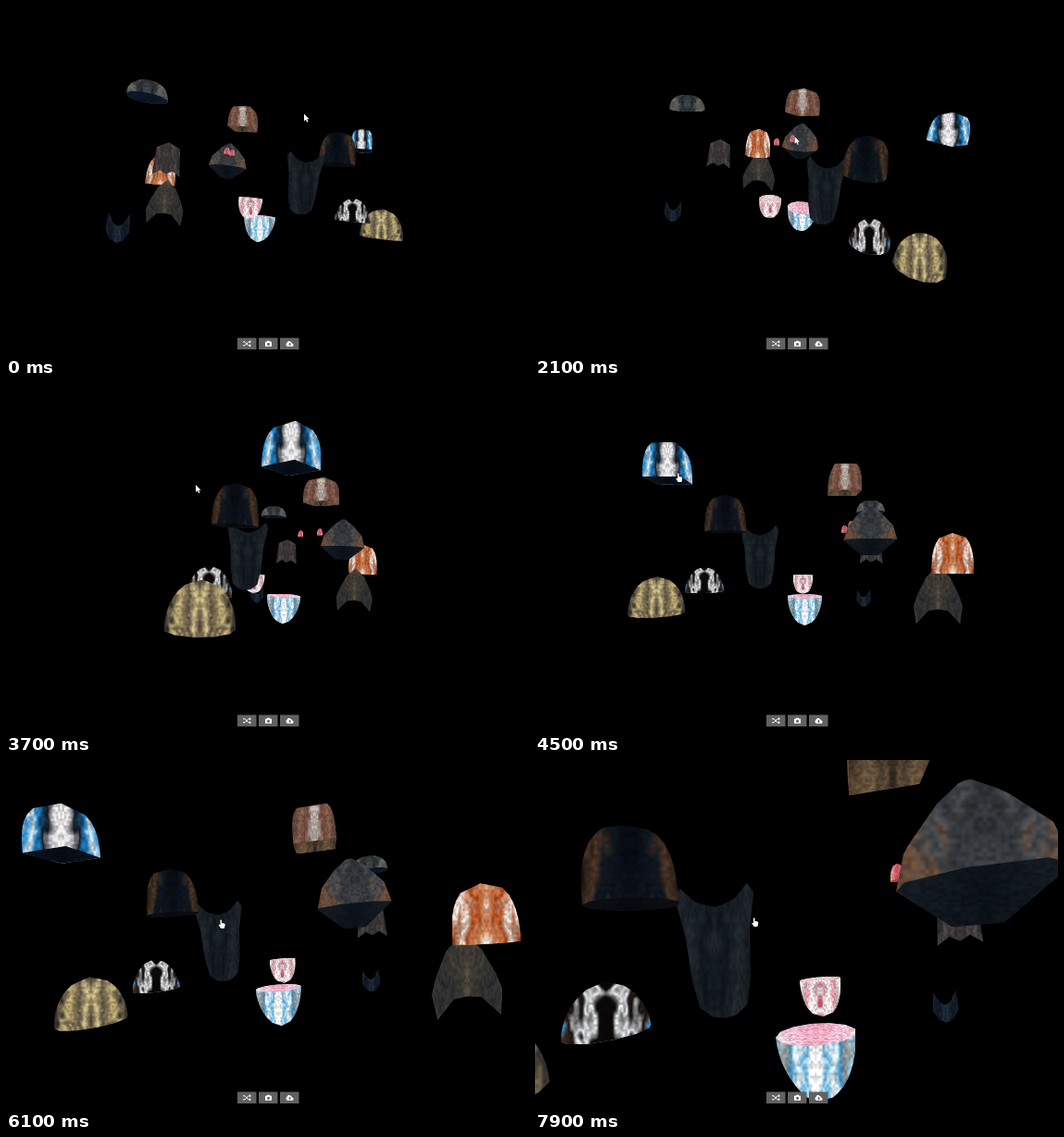
Recreate the animation shown at these times as an HTML page with a canvas. Size 565 px wide and 377 px high, loop 8 s.

```html
<!DOCTYPE html>
<html lang="en">
<head>
<meta charset="utf-8">
<title>Floating fragments</title>
<style>
  html, body { margin: 0; width: 100%; height: 100%; overflow: hidden; background: #000; }
  canvas { display: block; width: 565px; height: 377px; }
</style>
</head>
<body>
<canvas id="stage" width="565" height="377"></canvas>
<script>
const W = 565, H = 377, LOOP = 8000, STEP = 100, TEX = 96, FOCAL = 350;
const RAD = Math.PI / 180;
const ctx = document.getElementById('stage').getContext('2d');
const mix = (a, b, k) => a + (b - a) * k;

// Mirrored marble textures
const hash = (x, y, s) => {
  const v = Math.sin(x * 127.1 + y * 311.7 + s * 74.7) * 43758.5453;
  return v - Math.floor(v);
};
function noise(x, y, s) {
  const i = Math.floor(x), j = Math.floor(y);
  const soft = v => v * v * (3 - 2 * v);
  const u = soft(x - i), v = soft(y - j);
  return mix(mix(hash(i, j, s), hash(i + 1, j, s), u),
             mix(hash(i, j + 1, s), hash(i + 1, j + 1, s), u), v);
}
const rgb = hex => [1, 3, 5].map(i => parseInt(hex.substr(i, 2), 16));
let seed = 3;

// Colours run from the mirror axis to the edge
function marble(colors) {
  const cv = document.createElement('canvas');
  cv.width = cv.height = TEX;
  const g = cv.getContext('2d'), img = g.createImageData(TEX, TEX);
  const ramp = colors.split(' ').map(rgb), last = ramp.length - 1;
  seed += 7;
  for (let y = 0; y < TEX; y++) for (let x = 0; x < TEX; x++) {
    const u = Math.abs(x + .5 - TEX / 2) / (TEX / 2), v = y / TEX;
    const bend = noise(u * 3, v * 3, seed) - .5;
    const warp = noise(u * 3 + bend * 2, v * 2 + bend, seed + 1) * .6 + noise(u * 9, v * 7, seed + 2) * .25 - .42;
    const k = Math.max(0, Math.min(.999, u * .85 + .07 + warp * .8)) * last;
    const i = Math.floor(k), f = k - i;
    const light = .78 + .44 * noise(u * 20, v * 26, seed + 3);
    const o = (y * TEX + x) * 4;
    for (let c = 0; c < 3; c++) img.data[o + c] = mix(ramp[i][c], ramp[i + 1][c], f) * light;
    img.data[o + 3] = 255;
  }
  g.putImageData(img, 0, 0);
  return cv;
}

// Camera: time, yaw, pitch, roll, distance, drop
const CAMERA = [
  [0, 165, -4, -6, 350, 0],
  [600, 165, -4, -6, 350, 0],
  [1400, 155, 0, -10, 350, 0],
  [2800, 92, 33, 0, 345, 0],
  [3700, 47, 0, -3, 350, 0],
  [4500, 0, 0, 0, 350, 0],
  [5700, -10, 0, 5, 350, 0],
  [5900, -10, 0, 5, 350, 0],
  [6100, -10, 0, 5, 275, 4],
  [6400, -10, 0, 5, 250, 6],
  [6500, -10, 0, 5, 250, 6],
  [7200, -10, 0, 5, 165, 12],
  [LOOP, -10, 0, 5, 165, 12]
];

function slope(i, n) {
  const [a, b, c] = [CAMERA[i - 1], CAMERA[i], CAMERA[i + 1]];
  if (!a || !c || a[n] === b[n] || b[n] === c[n]) return 0;
  return (c[n] - a[n]) / (c[0] - a[0]);
}
function cameraAt(t) {
  const i = CAMERA.findIndex(k => k[0] > t) - 1;
  const p = CAMERA[i], q = CAMERA[i + 1], d = q[0] - p[0], s = (t - p[0]) / d, r = 1 - s;
  const at = n => p[n] * r * r * (1 + 2 * s) + q[n] * s * s * (3 - 2 * s) +
    d * s * r * (r * slope(i, n) - s * slope(i + 1, n));
  return { yaw: at(1) * RAD, pitch: at(2) * RAD, roll: at(3) * RAD, dist: at(4), drop: at(5) };
}

function project(cam, [x, y, z]) {
  const cy = Math.cos(cam.yaw), sy = Math.sin(cam.yaw);
  const cp = Math.cos(cam.pitch), sp = Math.sin(cam.pitch);
  const cr = Math.cos(cam.roll), sr = Math.sin(cam.roll);
  const px = x * cy + z * sy, pz = z * cy - x * sy;
  const py = y * cp - pz * sp, near = pz * cp + y * sp;
  const k = FOCAL / Math.max(20, cam.dist - near);
  return { x: 282 + (px * cr - py * sr) * k, y: 188 + cam.drop - (py * cr + px * sr) * k, k, near };
}

// Pieces sit at an angle, radius and height around the vertical axis
const pieces = [];
function add([angle, radius, y], [w, h], part) {
  pieces.push({ pos: [radius * Math.sin(angle * RAD), y, radius * Math.cos(angle * RAD)], w, h, ...part });
}

// A solid is a stack of rings, split at one level into an upper and a lower shell
function solid(place, size, sides, upper, lower, upColors, lowColors) {
  add(place, size, { sides, upper, lower, upTex: marble(upColors), lowTex: marble(lowColors) });
}
const arc = n => Array.from({ length: 9 }, (_, i) => [i / 8, Math.pow(1 - Math.pow(i / 8, n), 1 / n)]);
const dome = (place, size, sides, round, skin, base) =>
  solid(place, size, sides, arc(round), [[0, 1]], skin, base);
const bowl = (place, size, round, skin, lid) =>
  solid(place, size, 12, [[1, 1]], arc(round).map(([v, r]) => [1 - v, r]), lid, skin);

// A flat shape is half an outline, top to bottom, mirrored
const flat = (place, size, half, skin) => add(place, size, {
  outline: [...half, ...half.slice().reverse().map(([x, y]) => [-x, y])], tex: marble(skin)
});

dome([130, 130, 68], [37, 16], 12, 2.2, '#3c4144 #24282b #6a6a66 #343638', '#0a1522 #0c1a2a');
dome([54, 58, 77], [29, 29], 4, 3.2, '#b0a49c #6a4438 #7d5a4a #5c4238', '#2c241b #6b5640 #3c3023');
dome([77, 156, 4], [38, 39], 12, 2.6, '#f0e8e2 #c88a62 #a8481c #e6dcd4 #8c3f1a', '#a8481c #d8b090');
dome([-70, 75, 44], [41, 37], 12, 2.6, '#070b12 #0b1018 #10161e #4a3325 #16130f', '#07090d #0d1016');
dome([-42, 143, 72], [27, 29], 4, 2.8, '#e8e6e6 #b8b8bc #10151c #1a78b8 #d4dade #2c8fcc', '#060b13 #0a111c');
dome([-76, 95, -22], [38, 25], 12, 1.8, '#080706 #0c0a09 #dfe2e4 #14100e #4a3026 #2a86c6', '#2a86c6 #d8e4ec #1d6fae');
dome([-65, 138, -34], [48, 33], 12, 2, '#4b4034 #c9ba84 #5a5042 #b8a670 #34302b', '#2e2a25 #38332c');
bowl([163, 27, -32], [24, 22], 2.2, '#d0506a #c8c4c4 #f2e4e6 #e0909e #b4b0ae #fff4f4', '#f0dede #d8b0b8');
bowl([25, 21, -55], [36, 30], 1.8, '#f0f4f6 #6ab4dc #e4ecf0 #3a94c8 #8a8e90 #9cd0ea', '#f2a8c2 #f8dce6');
solid([53, 85, 24], [49, 45], 8, [[.32, 1], [.6, .85], [.85, .45], [1, .1]], [[0, .3], [.32, 1]],
  '#3c3f43 #2e3135 #45474a #6a4a34 #38393b', '#0c1219 #151b22');
dome([85, 52, 30], [7, 8], 10, 2, '#c4525c #e89a98', '#a83c40 #a83c40');
dome([62, 62, 32], [7, 8], 10, 2, '#c4525c #e89a98', '#a83c40 #a83c40');

flat([118, 105, 9], [28, 34], [[0, 1], [.85, .65], [1, -1], [.45, -.7], [0, -.9]],
  '#444040 #343131 #4a4543 #2d2b2b');
flat([77, 143, -37], [48, 57], [[0, 1], [.5, .6], [.85, 0], [1, -.4], [.9, -1], [.4, -.55], [0, -.5]],
  '#5a4e40 #3a3732 #2b2c2e #3c3b3a');
flat([138, 142, -58], [20, 25], [[0, .1], [.4, .3], [.9, 1], [1, -.2], [.6, -.75], [0, -1]],
  '#0c1622 #202e3b #0d151f #1a2633');
flat([-78, 39, 0], [40, 67],
  [[0, .68], [.25, .72], [.5, .78], [.85, 1], [1, .85], [.82, .3], [.74, -.4], [.6, -.82], [.3, -.97], [0, -1]],
  '#1b2229 #10161c #20272d #14191e');

function hull(pts) {
  pts = pts.slice().sort((a, b) => a.x - b.x || a.y - b.y);
  const chain = list => {
    const out = [];
    for (const p of list) {
      for (;;) {
        const [a, b] = out.slice(-2);
        if (!b || (b.x - a.x) * (p.y - a.y) - (b.y - a.y) * (p.x - a.x) > 0) break;
        out.pop();
      }
      out.push(p);
    }
    return out.slice(0, -1);
  };
  return [...chain(pts), ...chain(pts.slice().reverse())];
}

function paint(pts, tex) {
  const xs = pts.map(p => p.x), ys = pts.map(p => p.y);
  const x = Math.min(...xs), y = Math.min(...ys);
  ctx.save();
  ctx.beginPath();
  pts.forEach(p => ctx.lineTo(p.x, p.y));
  ctx.clip();
  ctx.drawImage(tex, x, y, Math.max(...xs) - x, Math.max(...ys) - y);
  ctx.restore();
}

function shell(p, cam, rings) {
  const reach = p.sides === 4 ? p.w / Math.SQRT2 : p.w / 2, pts = [];
  for (const [v, r] of rings) for (let i = 0; i < p.sides; i++) {
    const a = (i + .5) / p.sides * Math.PI * 2;
    pts.push(project(cam, [
      p.pos[0] + reach * r * Math.sin(a), p.pos[1] + (v - .5) * p.h, p.pos[2] + reach * r * Math.cos(a)
    ]));
  }
  return hull(pts);
}

function drawPiece(p, cam) {
  const c = project(cam, p.pos);
  if (p.outline) {
    const cr = Math.cos(cam.roll), sr = Math.sin(cam.roll);
    paint(p.outline.map(([u, v]) => {
      const x = u * p.w / 2 * c.k, y = v * p.h / 2 * c.k;
      return { x: c.x + x * cr - y * sr, y: c.y - y * cr - x * sr };
    }), p.tex);
    return;
  }
  const split = p.pos[1] + (p.upper[0][0] - .5) * p.h;
  const shells = [[p.lower, p.lowTex], [p.upper, p.upTex]];
  // Seen from below, the lower shell is in front
  if (cam.dist * Math.sin(cam.pitch) < split) shells.reverse();
  shells.forEach(([rings, tex]) => paint(shell(p, cam, rings), tex));
}

// Toolbar
const ICONS = [
  ['M0 2H2L6 6H8M0 6H2L6 2H8M7 .8L8.4 2 7 3.2M7 4.8L8.4 6 7 7.2', ''],
  ['', 'M1 2H2.5L3.2 1H5.8L6.5 2H8V7H1ZM4.5 3A1.5 1.5 0 1 0 4.5 6A1.5 1.5 0 1 0 4.5 3Z'],
  ['', 'M2 7A2 2 0 0 1 1.5 3.3A2.3 2.3 0 0 1 5.8 2.4A2 2 0 0 1 7.5 4A1.6 1.6 0 0 1 7.5 7ZM4 3.2V4.6H3L4.6 6.3 6.2 4.6H5.2V3.2Z']
].map(pair => pair.map(d => new Path2D(d)));

function drawButtons() {
  ICONS.forEach(([line, solidPart], i) => {
    const x = 250 + i * 23;
    ctx.fillStyle = '#616161';
    ctx.fillRect(x, 358.5, 20.5, 12.5);
    ctx.save();
    ctx.translate(x + 6, 360.8);
    ctx.strokeStyle = ctx.fillStyle = '#fff';
    ctx.stroke(line);
    ctx.fill(solidPart, 'evenodd');
    ctx.restore();
  });
}

// Pointer: time, x, y
const TRAIL = [
  [0, 322, 116.5], [200, 377, 185], [300, 325, 236], [400, 267, 205], [700, 267, 205],
  [1400, 308.5, 138.5], [2800, 252.5, 143.5], [3700, 205, 110], [4500, 152, 97], [5700, 229.5, 172],
  [6500, 229.5, 172], [7200, 226, 171.5], [7899, 226, 171.5], [7900, 234, 170], [LOOP, 234, 170]
];
const ARROW = new Path2D('M0 0V8L1.9 6.3 3.2 9 4.5 8.4 3.2 5.8H5.6Z');
const HAND = new Path2D('M2 .6Q3 0 3.5 1V4L6.4 4.6Q7.4 5 7.2 6.5L6.4 10H2.6L.2 6.6Q.2 5.6 1.2 5.8L2 6.4Z');

function drawPointer(t) {
  const i = TRAIL.findIndex(k => k[0] > t);
  const a = TRAIL[i - 1], b = TRAIL[i], s = (t - a[0]) / (b[0] - a[0]);
  const shape = t >= 4200 ? HAND : ARROW;
  ctx.save();
  ctx.translate(mix(a[1], b[1], s), mix(a[2], b[2], s));
  ctx.strokeStyle = '#000';
  ctx.stroke(shape);
  ctx.fillStyle = '#fff';
  ctx.fill(shape);
  ctx.restore();
}

function render(ms) {
  const t = Math.floor(ms % LOOP / STEP) * STEP, cam = cameraAt(t);
  ctx.fillStyle = '#000';
  ctx.fillRect(0, 0, W, H);
  pieces
    .map(p => ({ p, near: project(cam, p.pos).near }))
    .sort((a, b) => a.near - b.near)
    .forEach(({ p }) => drawPiece(p, cam));
  drawButtons();
  drawPointer(t);
}

const start = performance.now();
function tick() {
  render(performance.now() - start);
  requestAnimationFrame(tick);
}
tick();
</script>
</body>
</html>
```
